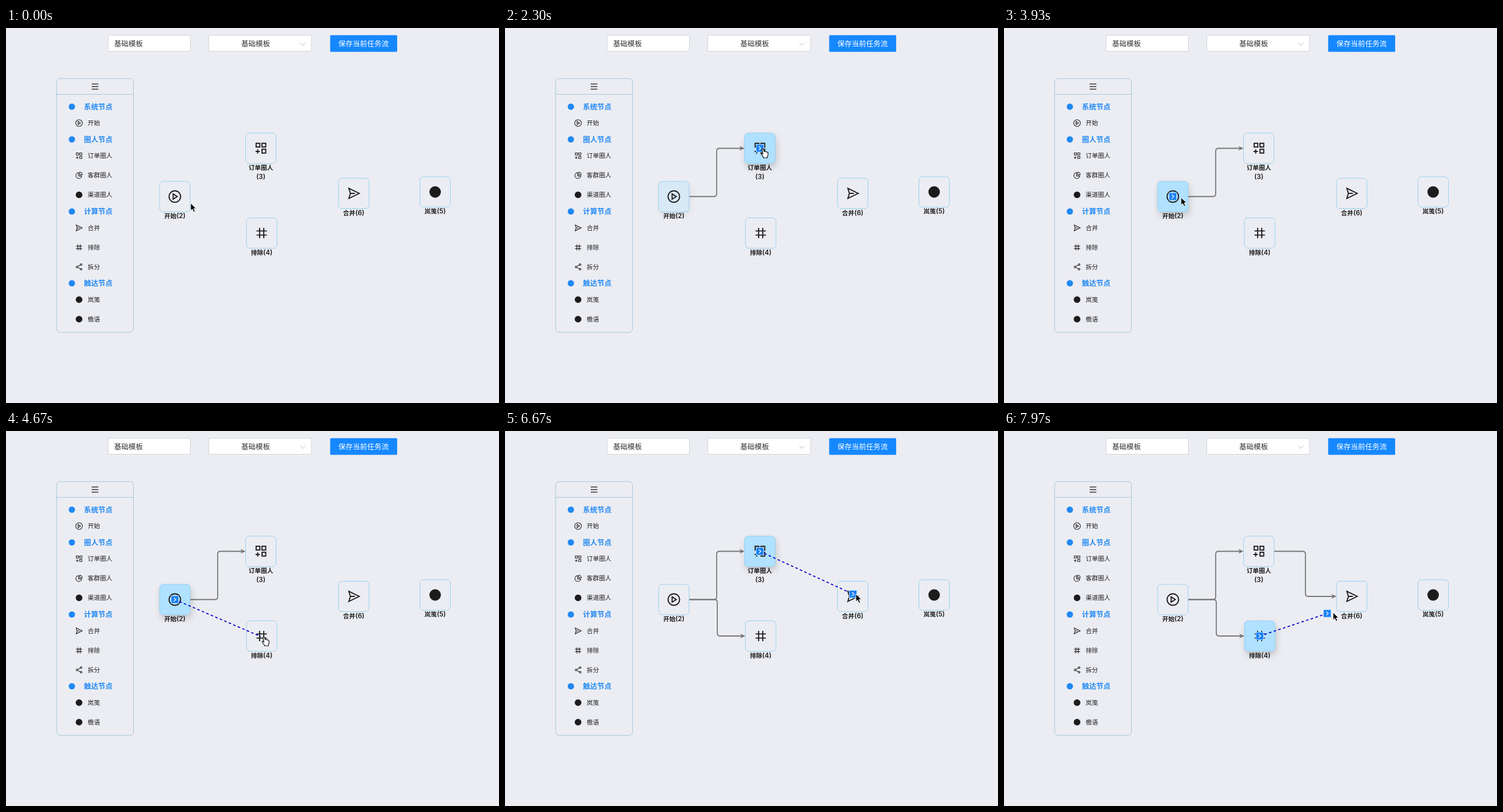
Animation of 857 by 653 pixels, one loop 8 s. Source, as an HTML page:

```html
<!DOCTYPE html>
<html lang="zh-CN">
<head>
<meta charset="utf-8">
<style>
html, body { margin: 0; width: 100%; height: 100%; overflow: hidden; background: #ecedf2; }
svg { display: block; width: 100vw; height: 100vh; }
text { font-family: Inter, 'Noto Sans CJK SC', 'Noto Sans CJK', 'Noto Sans', sans-serif; }
.glow { fill: #b0e1ff; filter: drop-shadow(2px 6px 6px rgba(0, 0, 0, .18)); }
</style>
</head>
<body>
<svg id="stage" viewBox="0 0 857 653"></svg>
<script>
const LOOP = 8000;
const INK = '#1c1c1c', BLUE = '#2089f5';
const stage = document.getElementById('stage');

function add(tag, attrs, parent = stage) {
  const el = document.createElementNS('http://www.w3.org/2000/svg', tag);
  for (const k in attrs) el.setAttribute(k, attrs[k]);
  parent.appendChild(el);
  return el;
}
function label(str, x, y, size, fill, weight = 400, anchor = 'start', parent = stage) {
  const el = add('text', { x, y: y + size * 0.37, 'font-size': size, fill, 'font-weight': weight, 'text-anchor': anchor }, parent);
  const cut = str.indexOf('(');
  el.textContent = cut < 0 ? str : str.slice(0, cut);
  if (cut >= 0) add('tspan', { 'font-size': 11.5 }, el).textContent = str.slice(cut);
  return el;
}
const box = (x, y, w, h, attrs, parent) => add('rect', { x, y, width: w, height: h, ...attrs }, parent);

// Icons are drawn around 0,0 in a box of about 20 units
const ICONS = {
  play: 'M10 0A10 10 0 1 1-10 0A10 10 0 1 1 10 0ZM-3-4.6L4.2 0L-3 4.6Z',
  order: 'M-8.2-8.7H-1.7V-2.2H-8.2ZM2-8.7H8.5V-2.2H2ZM2 1.7H8.5V8.2H2ZM-5.5 1.8V9.3M-9.2 5.5H-1.8',
  pie: 'M-1.5-8A8.8 8.8 0 1 0 8 2H-1.5ZM2-9.5A8 8 0 0 1 9.5-1.8H2Z',
  merge: 'M-8.5-8.8L9.5 0L-8.5 8.8L-5.8 0ZM-5.8 0H2',
  hash: 'M-3.6-9V9M3.6-9V9M-9-3.6H9M-9 3.6H9',
  share: 'M-3.5-1.5L4-6M-3.5 1.5L4 6M-3.5 0A2.6 2.6 0 1 1-8.7 0A2.6 2.6 0 1 1-3.5 0ZM8.7-6.8A2.5 2.5 0 1 1 3.7-6.8A2.5 2.5 0 1 1 8.7-6.8ZM8.7 6.8A2.5 2.5 0 1 1 3.7 6.8A2.5 2.5 0 1 1 8.7 6.8Z'
};
function icon(name, x, y, scale, color = INK, parent = stage) {
  if (name === 'dot') return add('circle', { cx: x, cy: y, r: 10 * scale, fill: color }, parent);
  return add('path', {
    d: ICONS[name], transform: `translate(${x} ${y}) scale(${scale})`,
    fill: 'none', stroke: color, 'stroke-width': 1.9
  }, parent);
}

// Top bar
const field = { rx: 1.5, fill: '#fff', stroke: '#d3d4d8' };
box(177.5, 12.5, 143, 28, field);
label('基础模板', 188, 27, 12.5, '#333');
box(352.5, 12.5, 178.5, 28, field);
label('基础模板', 434, 27, 12.5, '#333', 400, 'middle');
add('path', { d: 'M511.8 25.5L516 30.5L520.2 25.5', fill: 'none', stroke: '#bfbfbf' });
box(563.5, 12.5, 116.5, 29, { rx: 1.5, fill: '#1688ff' });
label('保存当前任务流', 621.5, 27, 12.5, '#fff', 400, 'middle');

// Side panel
box(88, 88, 133.5, 442, { rx: 6, fill: 'none', stroke: '#a3c6dc' });
add('path', { d: 'M88 115.5H221.5', stroke: '#a3c6dc' });
add('path', { d: 'M149 97.5H160.5M149 102H160.5M149 106.5H160.5', stroke: '#333', 'stroke-width': 1.3 });
[['系统节点', 137], ['圈人节点', 194], ['计算节点', 319.5], ['触达节点', 444.5]].forEach(([s, y]) => {
  icon('dot', 114.5, y, 0.55, BLUE);
  label(s, 135.5, y, 12.4, BLUE, 600);
});
[['开始', 165.5, 'play'], ['订单圈人', 222.5, 'order'], ['客群圈人', 256.5, 'pie'], ['渠道圈人', 290.5, 'dot'],
 ['合并', 348, 'merge'], ['排除', 382, 'hash'], ['拆分', 416, 'share'], ['岚笺', 473, 'dot'], ['檐语', 507, 'dot']
].forEach(([s, y, name]) => {
  icon(name, 127, y, 0.58);
  label(s, 142, y, 10.7, INK, 500);
});

// Connections, shown from a given time on
const edges = [
  [2000, 'M320 293.5H363Q368 293.5 368 288.5V214.5Q368 209.5 373 209.5H412', 416.5, 209.5],
  [4710, 'M320 293.5H364Q369 293.5 369 298.5V352Q369 357 374 357H414', 418, 357],
  [6740, 'M469.5 209.5H519Q524 209.5 524 214.5V283Q524 288 529 288H574', 578, 288]
].map(([from, d, x, y]) => {
  const el = add('g', {});
  add('path', { d, fill: 'none', stroke: '#777', 'stroke-width': 1.8 }, el);
  add('path', { d: `M${x} ${y}l-9 -4l2.5 4l-2.5 4Z`, fill: '#777' }, el);
  return { from, el };
});

function port(parent) {
  const g = add('g', {}, parent);
  box(-7, -7, 14, 14, { fill: '#b5dcfb' }, g);
  box(-6, -6, 12, 12, { fill: '#1b80f5' }, g);
  add('path', { d: 'M-1.8 -3.2L1.8 0L-1.8 3.2', fill: 'none', stroke: '#fff', 'stroke-width': 1.2 }, g);
  return g;
}

// Nodes with their hover periods
const nodes = [
  [293.5, 293.5, 'play', ['开始(2)'], [[90, 2000], [3330, 4710]]],
  [443, 209.5, 'order', ['订单圈人', '(3)'], [[2000, 3095], [5060, 6740]]],
  [444.5, 357, 'hash', ['排除(4)'], [[4710, 4930], [7330, 9000]]],
  [604.5, 288, 'merge', ['合并(6)'], [[6740, 6930]]],
  [746, 285.5, 'dot', ['岚笺(5)'], []]
].map(([x, y, name, lines, hovers]) => {
  const g = add('g', { transform: `translate(${x} ${y})` });
  const frame = { rx: 6 };
  const glow = box(-26.5, -26.5, 53, 53, { ...frame, class: 'glow' }, g);
  box(-26.5, -26.5, 53, 53, { ...frame, fill: 'none', stroke: '#97d0f2' }, g);
  icon(name, 0, 0, 1, INK, g);
  lines.forEach((s, i) => label(s, 0, 34 + i * 16, 10.7, INK, 600, 'middle', g));
  return { x, y, hovers, glow };
});

const wire = add('path', { fill: 'none', stroke: '#0808cc', 'stroke-width': 1.8, 'stroke-dasharray': '4.5 4' });
nodes.forEach(n => {
  n.port = port(add('g', { transform: `translate(${n.x} ${n.y})` }));
});
const ghost = port(stage);
const arrow = add('path', {
  d: 'M0 0V13.2L3 10.4L5.2 15.4L7.6 14.3L5.4 9.4H9.5Z',
  fill: '#000', stroke: '#fff', 'stroke-width': 0.9
});
const hand = add('path', {
  d: 'M-1.3 1.2Q0-.6 1.3 1.2L2.4 5.2Q4 4.2 4.8 5.6Q6.2 4.8 7 6.2Q9 5.8 9.2 7.6V11.5Q8.8 13 8 14.2V16H1.2V14.6Q-1 12-2.8 9.2Q-2.6 7.6-.9 8.4L.3 9.4Z',
  fill: '#fff', stroke: '#000', 'stroke-width': 1.1
});

// Pointer track: time, x, y
const track = [
  [0, 321, 305], [30, 321, 305], [400, 298, 290], [1300, 298, 291], [1405, 325, 284], [1470, 364, 257],
  [1640, 438, 216], [1740, 448, 209], [2900, 448, 211], [3090, 416, 231], [3170, 360, 254], [3330, 315, 280],
  [3430, 298, 291], [3900, 298, 291], [4350, 440, 352], [4450, 448, 358], [4880, 448, 358], [5090, 447, 211],
  [5830, 447, 211], [5900, 495, 237], [6250, 600, 280], [6400, 610, 284], [6840, 610, 284], [7350, 460, 352],
  [7480, 448, 358], [7590, 448, 358], [7890, 560, 320], [7970, 572, 316], [8000, 574, 315]
];
// Drags: start, drop, release, source node
const drags = [[1300, 1960, 2000, 0], [3900, 4640, 4710, 0], [5830, 6700, 6740, 1], [7590, 9000, 9000, 2]];

const clamp = v => Math.max(0, Math.min(1, v));
const show = (el, on) => el.setAttribute('visibility', on ? 'visible' : 'hidden');
const move = (el, x, y) => el.setAttribute('transform', `translate(${x.toFixed(2)} ${y.toFixed(2)})`);

function pointer(t) {
  const i = Math.max(1, track.findIndex(k => k[0] >= t));
  const [a, b] = [track[i - 1], track[i]];
  const p = clamp((t - a[0]) / (b[0] - a[0]));
  return [a[1] + (b[1] - a[1]) * p, a[2] + (b[2] - a[2]) * p];
}

function render(t) {
  edges.forEach(e => show(e.el, t >= e.from));

  let hovering = false;
  nodes.forEach(n => {
    let glow = 0, active = false;
    n.hovers.forEach(([a, b]) => {
      if (t < a) return;
      if (t < b) active = true;
      glow = Math.max(glow, t < b ? clamp((t - a) / 200) : 1 - clamp((t - b) / 450));
    });
    n.glow.setAttribute('opacity', glow);
    n.port.setAttribute('opacity', active ? glow : 0);
    hovering = hovering || active;
  });

  const drag = drags.find(d => t >= d[0] && t < d[2]);
  const carrying = !!drag && t < drag[1];
  show(wire, drag);
  show(ghost, carrying);
  if (drag) {
    const from = nodes[drag[3]];
    const [wx, wy] = pointer(t - 65);
    wire.setAttribute('d', `M${from.x} ${from.y}L${wx - 5} ${wy}`);
    const [gx, gy] = pointer(t - 35);
    move(ghost, gx - 5, gy);
    ghost.setAttribute('opacity', clamp((t - drag[0]) / 380));
  }

  const [x, y] = pointer(t);
  const useHand = hovering && !carrying;
  show(hand, useHand);
  show(arrow, !useHand);
  move(useHand ? hand : arrow, x, y);
}

const begin = performance.now();
function tick() {
  render((performance.now() - begin) % LOOP);
  requestAnimationFrame(tick);
}
tick();
</script>
</body>
</html>
```
